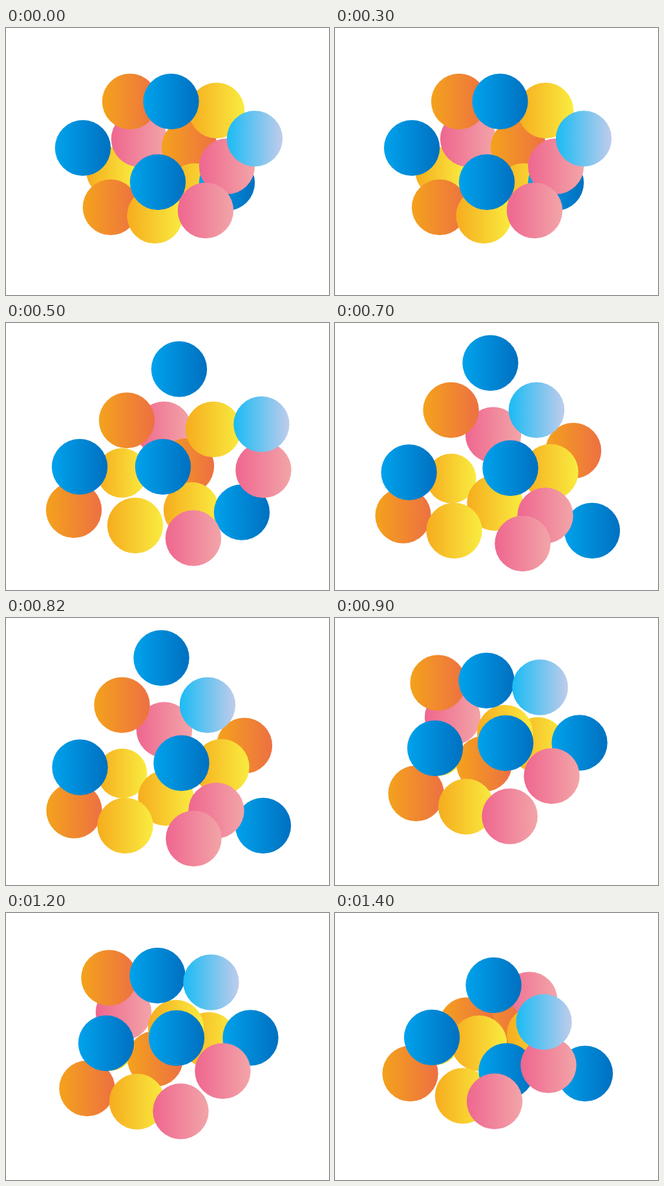
Animation, 500 px wide and 414 px high, one loop 1.6 s. Source, as an HTML page:

```html
<!DOCTYPE html>
<html lang="en">
<head>
<meta charset="utf-8">
<title>Bouncing balls</title>
<style>
  html, body { margin: 0; width: 100%; height: 100%; overflow: hidden; background: #fff; }
  svg { display: block; width: 100%; height: 100%; }
</style>
</head>
<body>
<svg id="stage" viewBox="0 0 500 414"></svg>
<script>
const stage = document.getElementById('stage');
const LOOP = 1600;

const COLORS = {
  blue: ['#00a2ec', '#0070c0'],
  sky: ['#1abbf4', '#c0cceb'],
  orange: ['#f4a21c', '#ed7042'],
  yellow: ['#f6ac1e', '#f9ec40'],
  pink: ['#ef668f', '#f2a5a8']
};

// The whole heap sways; each ball then only hops within the heap
const POSES = [
  { start: 0, sway: [0, 0] },
  { start: 500, sway: [-5, 37] },
  { start: 700, sway: [-4.5, 45.5] },
  { start: 900, sway: [-24.5, 11] },
  { start: 1400, sway: [-29.5, 2] }
];

// Back to front: colour and resting points; a ball stays put on "-"
// and after its last point
const BALLS = [
  ['yellow', '163,223 184.5,195.5'],
  ['pink', '206,172 249.5,128 - 206.5,143 330.5,132.5'],
  ['orange', '284,185 - 373.5,152.5 255.5,215 276.5,176'],
  ['orange', '192,114 - 184,89.5 - 233.5,172'],
  ['yellow', '292,253 - 252,233.5 338.5,186'],
  ['yellow', '326,128 - 338,185.5 287.5,167 252.5,200'],
  ['orange', '162,278 110,253 - 150,261 146,247'],
  ['yellow', '230.5,291 205,277 189,276.5 227.5,281.5'],
  ['blue', '255.5,114 273,34.5 245,16.5 259,86 275,110'],
  ['blue', '342,240 370,256.5 402.5,276.5 403,182.5 416.5,247'],
  ['blue', '235,239 248,186 276,179.5 288.5,183 295,243'],
  ['blue', '119,186 - - 179.5,191'],
  ['pink', '342,214.5 403.5,191 330,253 360,234'],
  ['sky', '385,171.5 400.5,120 316.5,89.5 342,96.5 353,167'],
  ['pink', '309,283 295,296.5 - - 276.5,290']
];

function add(parent, tag, attrs) {
  const node = document.createElementNS('http://www.w3.org/2000/svg', tag);
  for (const key in attrs) node.setAttribute(key, attrs[key]);
  return parent.appendChild(node);
}

const defs = add(stage, 'defs', {});
for (const [id, [left, right]] of Object.entries(COLORS)) {
  const gradient = add(defs, 'linearGradient', { id });
  add(gradient, 'stop', { offset: 0, 'stop-color': left });
  add(gradient, 'stop', { offset: 1, 'stop-color': right });
}

const heap = add(stage, 'g', {});
const balls = BALLS.map(([color, path], depth) => ({
  // The rearmost ball is a little smaller
  node: add(heap, 'circle', { r: depth ? 43.2 : 38.5, fill: `url(#${color})` }),
  points: path.split(' ')
}));

function place({ node, points }, pose) {
  const point = points.slice(0, pose + 1).filter(p => p !== '-').pop();
  const [cx, cy] = point.split(',');
  node.setAttribute('cx', cx);
  node.setAttribute('cy', cy);
}

let shown = -1;
function show(pose) {
  if (pose === shown) return;
  shown = pose;
  heap.setAttribute('transform', `translate(${POSES[pose].sway})`);
  balls.forEach(ball => place(ball, pose));
}

const begin = performance.now();
function tick() {
  const time = (performance.now() - begin) % LOOP;
  show(POSES.filter(({ start }) => start <= time).length - 1);
  requestAnimationFrame(tick);
}
tick();
</script>
</body>
</html>
```
